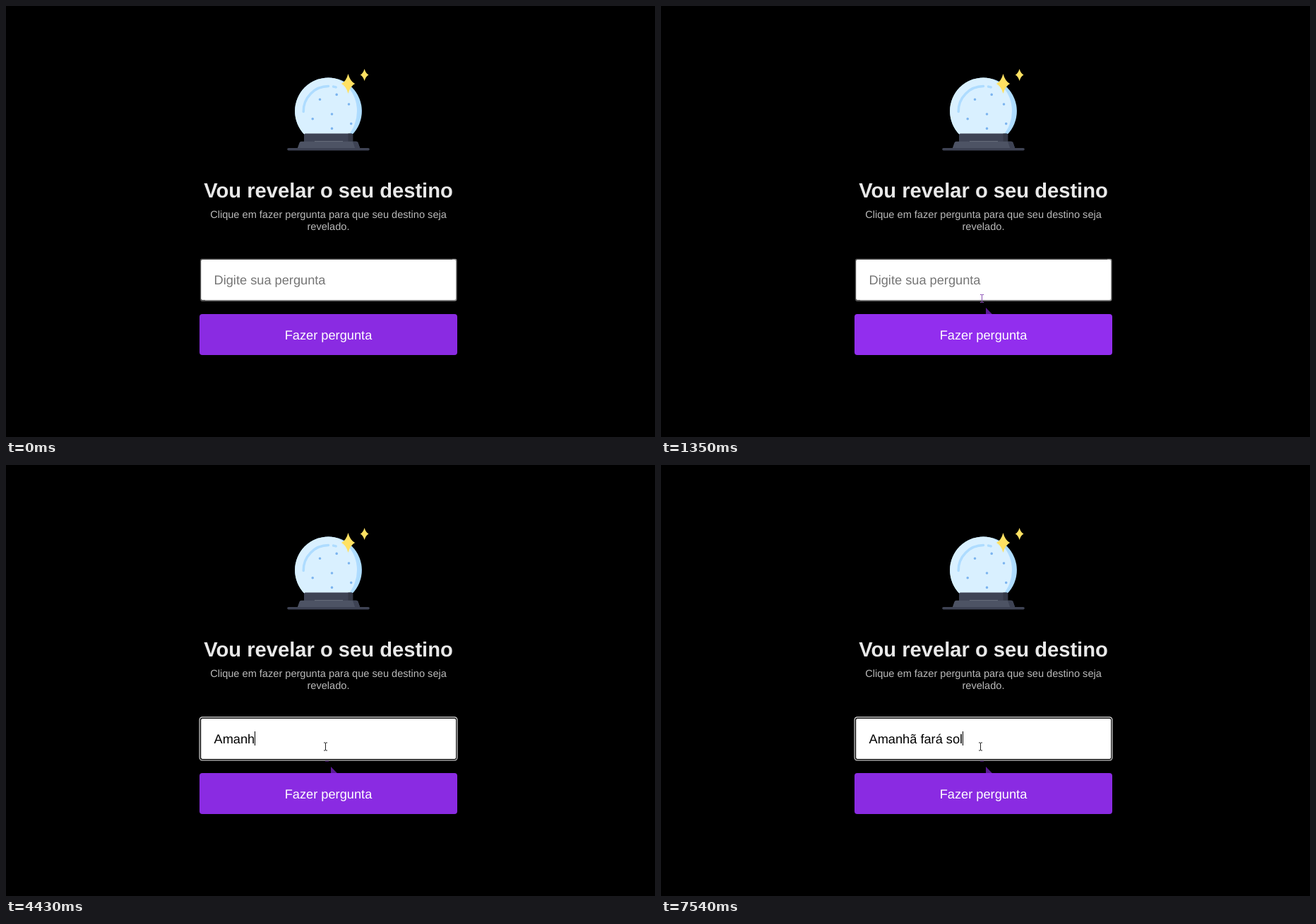
These frames come from a looping animation (919x610 px, 8000 ms). An HTML page:

```html
<!DOCTYPE html>
<html lang="pt-BR">
<head>
<meta charset="utf-8">
<title>Vou revelar o seu destino</title>
<style>
  html, body { margin: 0; width: 100%; height: 100%; overflow: hidden; background: #000; }
  svg { display: block; width: 100vw; height: 100vh; }
  text { font-family: "Liberation Sans", Arial, sans-serif; text-rendering: geometricPrecision; white-space: pre; }
  .centered { text-anchor: middle; }
  .label { font-size: 18.23px; }
  .subtitle { font-size: 14.58px; fill: #bababa; }
</style>
</head>
<body>
<svg viewBox="0 0 919 610">
  <defs>
    <clipPath id="dome"><circle cx="456.5" cy="148.8" r="47.4"/></clipPath>
    <linearGradient id="inset" x1="0" y1="0" x2="1" y2="1">
      <stop offset=".5" stop-color="#4a4a4a"/><stop offset=".5" stop-color="#858585"/>
    </linearGradient>
  </defs>

  <!-- Crystal ball -->
  <g clip-path="url(#dome)">
    <rect x="408" y="100" width="97" height="82" fill="#aedcff"/>
    <ellipse cx="452.5" cy="148.8" rx="44.5" ry="49" fill="#d9f0ff"/>
  </g>
  <path d="M421.2 149.5A35.3 35.3 0 0 1 456.5 113.6M463.6 114.1l3.6.8" fill="none" stroke="#aedcff" stroke-width="3.5" stroke-linecap="round"/>
  <path d="M444.5 132.2h0M468.2 125.4h0M485.5 139h0M434.2 159.7h0M461.5 153h0M488.7 166.6h0M461.5 173.4h0" stroke="#7cb4ef" stroke-width="3.6" stroke-linecap="round"/>
  <path d="M422 192v-9.500q0-2 2-2h65.200q2 0 2 2v9.500z" fill="#3e4354"/>
  <path d="M484.500 192v-11.500h4.700q2 0 2 2v9.500z" fill="#343846"/>
  <path d="M412.500 202l3-8.500q.6-1.800 2.500-1.800h78q1.900 0 2.500 1.800l3 8.500z" fill="#4d5364"/>
  <path d="M491 191.700h5q1.900 0 2.500 1.800l3 8.500h-7z" fill="#3e4354"/>
  <path d="M437 191.600h40" stroke="#737987" stroke-width=".8"/>
  <path d="M400 202.700h113" stroke="#3e4354" stroke-width="3.6" stroke-linecap="round"/>
  <g fill="#ffe162">
    <path d="M484.500 96q2.800 10.500 9.600 14q-6.800 3.500-9.600 14q-2.800-10.500-9.600-14q6.800-3.500 9.600-14z"/>
    <path d="M507.600 89q1.800 6.300 5.900 8.500q-4.100 2.200-5.900 8.500q-1.800-6.300-5.900-8.500q4.100-2.200 5.900-8.500z"/>
  </g>

  <text class="centered" x="456.5" y="271" font-size="29.17" font-weight="700" fill="#e9e9e9">Vou revelar o seu destino</text>
  <text class="centered subtitle" x="456.5" y="299.900">Clique em fazer pergunta para que seu destino seja</text>
  <text class="centered subtitle" x="456.5" y="316.600">revelado.</text>

  <!-- Question field -->
  <rect id="border" x="274.800" y="357.500" width="363.700" height="60.200" rx="3" fill="url(#inset)"/>
  <g id="focusRing">
    <rect x="273.500" y="356.300" width="366" height="62.300" rx="4.500" fill="#e8e8e8"/>
    <rect x="274.600" y="357.400" width="363.800" height="60.100" rx="3.500" fill="#101010"/>
  </g>
  <rect x="276.200" y="358.900" width="360.900" height="57.200" rx="2" fill="#fff"/>
  <text id="question" class="label" x="294.500" y="393.500"></text>
  <rect id="caret" y="377" width="1" height="20" fill="#000"/>

  <!-- Traces left behind by the pointer -->
  <path id="arrowTrace" d="M460 427v9.500h9.300z" fill="#5c1a99"/>
  <path id="beamTrace" d="M452 419.300h5" stroke="#3c1263" stroke-width="1.300"/>

  <rect id="button" x="274" y="436" width="365" height="58" rx="4"/>
  <text class="centered label" x="456.5" y="471.500" fill="#fff">Fazer pergunta</text>

  <!-- Pointers, each with its hot spot at the origin -->
  <g id="pointer">
    <path id="arrow" d="M0 0v16.500l3.800-3.600 2.500 5.700 2.600-1.100-2.500-5.600h5.300z" fill="#fff" stroke="#000"/>
    <path id="hand" d="M-1.400 10V1.200a1.500 1.500 0 0 1 3 0v4.600q1.400-1 2.600.4q1.500-.8 2.500.6q2.100-.3 2.100 1.900v3.600q0 1.800-1.500 3.600v1.900H.4v-1.500l-4.700-6q-.8-1.400.5-1.900q1-.3 2.400 1.600zM1.600 5.800v3.500M4.200 6.400v3M6.700 7v2.600" fill="#fff" stroke="#111"/>
    <path id="beam" d="M-2.500-5.500h2l.5.500.5-.5h2M0-5V5M-2.500 5.500h2l.5-.5.5.5h2" fill="none"/>
  </g>
</svg>
<script>
const LOOP = 8000;
const MOVE_START = 790, MOVE_STEP = 69.1, FOCUS_AT = 1680, BLINK = 530;
const QUESTION = "Amanhã fará sol";
const KEY_TIMES = [3620, 3880, 4010, 4160, 4430, 4820, 5350, 5620, 5750, 6040, 6490, 6810, 7210, 7410, 7540];
const POINTER_PATH = [
  [862, 506], [770, 492], [660, 473], [570, 459], [510, 448], [480.5, 440.5],
  [467, 436], [460, 427], [454.5, 414], [453, 407], [452.5, 401], [452.5, 398.5]
];
const TEXT_X = 294.5;

const el = id => document.getElementById(id);
const show = (id, visible) => el(id).setAttribute("display", visible ? "inline" : "none");
const ramp = (t, from, to) => Math.min(1, Math.max(0, (t - from) / (to - from)));
const mix = (a, b, k) => `rgb(${a.map((v, i) => Math.round(v + (b[i] - v) * k))})`;

function drawPointer(t) {
  const step = Math.min(POINTER_PATH.length - 1, Math.floor((t - MOVE_START) / MOVE_STEP));
  show("pointer", step >= 0);
  show("arrowTrace", step >= 8);
  show("beamTrace", step >= 9);
  if (step < 0) return;

  const [x, y] = POINTER_PATH[step];
  const overButton = x < 639 && y >= 436 && y < 494;
  const overField = y < 418;
  el("pointer").setAttribute("transform", `translate(${x} ${y})`);
  show("hand", overButton);
  show("beam", overField);
  show("arrow", !overButton && !overField);
  el("beam").setAttribute("stroke", step === 8 ? "#8a4fb5" : "#222");
}

function drawField(t) {
  const focused = t >= FOCUS_AT;
  const typed = KEY_TIMES.filter(time => t >= time).length;
  const question = el("question");
  show("border", !focused);
  show("focusRing", focused);
  question.textContent = typed ? QUESTION.slice(0, typed) : "Digite sua pergunta";
  question.setAttribute("fill", typed ? "#000" : "#757575");

  const blinkOn = Math.floor((t - FOCUS_AT) / BLINK) % 2 === 0;
  show("caret", focused && (typed > 0 || blinkOn));
  const width = typed ? question.getComputedTextLength() : 0;
  el("caret").setAttribute("x", Math.round(TEXT_X + width));
}

function draw(t) {
  drawPointer(t);
  drawField(t);
  const hover = ramp(t, 980, 1150) - ramp(t, 1500, 1750);
  el("button").setAttribute("fill", mix([138, 43, 226], [146, 46, 238], hover));
}

const start = performance.now();
function tick() {
  draw((performance.now() - start) % LOOP);
  requestAnimationFrame(tick);
}
tick();
</script>
</body>
</html>
```
